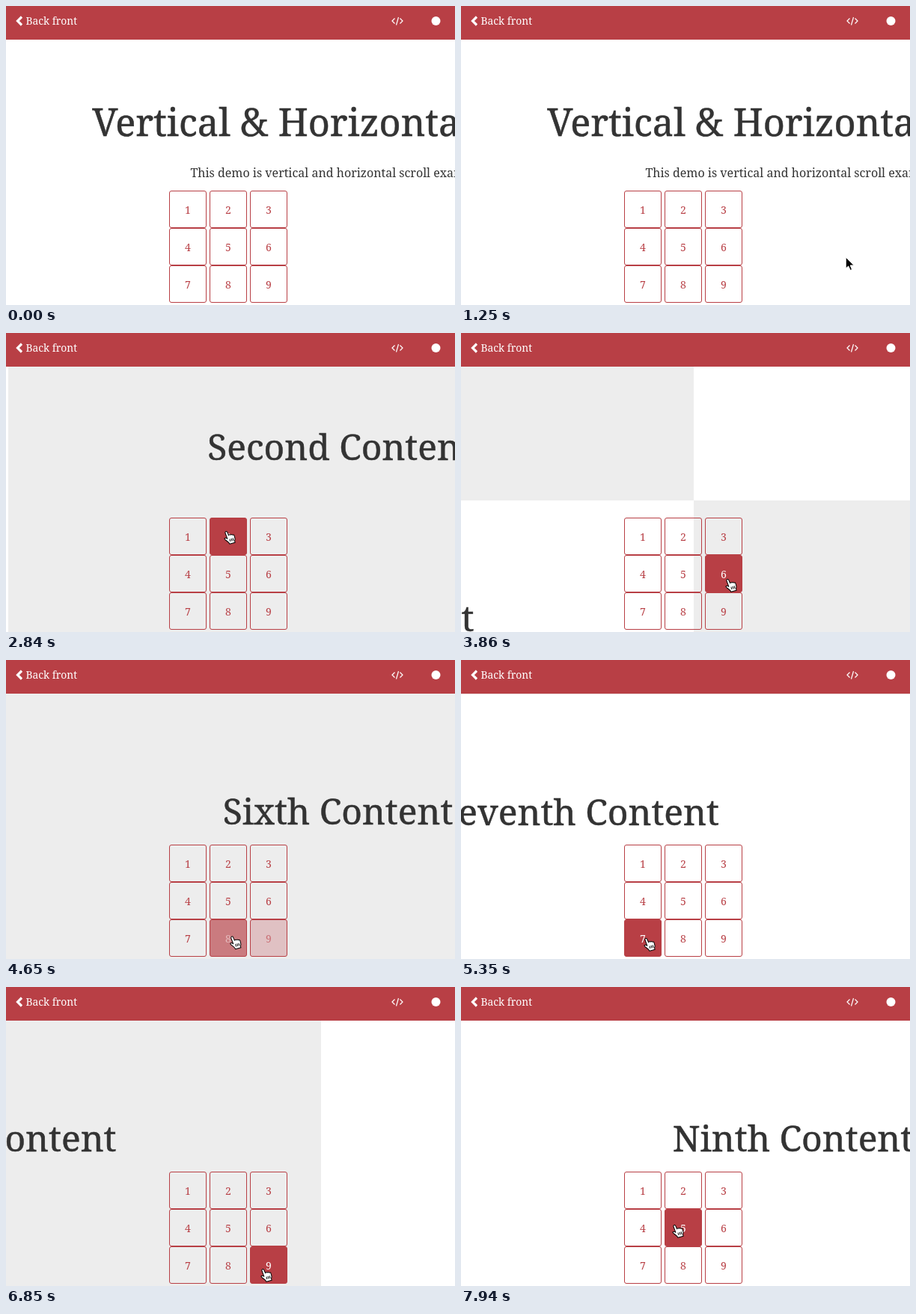
Recreate the animation shown at these times as an HTML page. Size 600 by 400 pixels, loop 8 s.

```html
<!DOCTYPE html>
<html lang="en">
<head>
<meta charset="utf-8">
<title>Vertical and horizontal scroll</title>
<style>
  html, body { margin: 0; width: 100%; height: 100%; overflow: hidden; background: #fff; }
  svg { display: block; width: 600px; height: 400px; font-family: "Noto Serif", serif; }
  .mid { text-anchor: middle; }
  .title { stroke: #333; stroke-width: .5; }
</style>
</head>
<body>
<svg viewBox="0 0 600 400">
  <g id="page" fill="#333"></g>
  <rect width="600" height="45" fill="#b83f45"/>
  <g fill="none" stroke="#fff">
    <path d="M21 14.5L15.5 20L21 25.5" stroke-width="3.2"/>
    <path d="M519.5 16.5L516 20L519.5 23.5M526.5 16.5L530 20L526.5 23.5M524.5 15L521.5 25.5" stroke-width="1.2"/>
  </g>
  <circle cx="574.5" cy="20" r="6" fill="#fff"/>
  <text x="26.5" y="25" font-size="13.8" fill="#fff">Back front</text>
  <g id="pad" font-size="14"></g>
  <path id="arrow" d="M0 0V15L3.5 12L6 17.5L8.3 16.5L6 11H11Z" stroke="#fff"/>
  <g id="hand" stroke="#000" stroke-linejoin="round">
    <g transform="translate(-2) rotate(-15)">
      <path fill="#fff" d="M-1.4 1.2Q-1.4 -.5 .1 -.5T1.6 1.2L2.3 5.5Q3 4.3 4.8 5.5Q6.2 4.7 7.2 6.2Q9.3 6 9.3 8V11Q9.3 13 8 14.5V17H.5Q.3 15 -2.5 11.5Q-4.8 9 -4.2 8Q-2.8 6.8 -.6 9.5Z"/>
      <path fill="none" d="M2.3 10.5V14M4.5 10.5V14M6.6 10.5V14"/>
    </g>
  </g>
</svg>
<script>
const LOOP = 8000, W = 887, H = 560, TOP = -5, BAR = 50;
const CELL = 50, SCROLL_MS = 800, FADE_MS = 200;
const ORDINALS = ['Second', 'Third', 'Fourth', 'Fifth', 'Sixth', 'Seventh', 'Eighth', 'Ninth'];

// The pointer glides to each stop; a click there scrolls to the section of that button.
const ENTRY = [562, 415];
const STOPS = [
  { leave: 580, arrive: 830, at: [536, 343] },
  { leave: 1080, arrive: 2000, at: [296, 266], click: 2191.4 },
  { leave: 2960, arrive: 3600, at: [358, 330], click: 3740 },
  { leave: 4270, arrive: 4680, at: [303, 371], click: 4720 },
  { leave: 4950, arrive: 5180, at: [249, 373], click: 5220 },
  { leave: 6220, arrive: 6440, at: [345, 378], click: 6685 },
  { leave: 7570, arrive: 7780, at: [287, 319] }
];

const $ = id => document.getElementById(id);
const clamp = p => Math.min(1, Math.max(0, p));
const mix = (a, b, p) => a.map((v, i) => v + (b[i] - v) * p);
const smooth = p => p * p * (3 - 2 * p);
const easeOutExpo = p => p === 1 ? 1 : 1 - 2 ** (-10 * p);

function add(parent, tag, attrs, text = '') {
  const el = document.createElementNS('http://www.w3.org/2000/svg', tag);
  for (const key in attrs) el.setAttribute(key, attrs[key]);
  el.textContent = text;
  return parent.appendChild(el);
}

const label = (parent, x, y, size, text, style = '') =>
  add(parent, 'text', { class: 'mid ' + style, x, y, 'font-size': size }, text);

const cells = Array.from({ length: 9 }, (_, i) => {
  const col = i % 3, row = Math.floor(i / 3);
  const section = add($('page'), 'g', { transform: `translate(${col * W} ${row * H})` });
  add(section, 'rect', { width: W, height: H, fill: i % 2 ? '#ededed' : '#fff' });
  if (i) {
    label(section, W / 2, 175, 48, ORDINALS[i - 1] + ' Content', 'title');
  } else {
    label(section, W / 2, 179, 50.5, 'Vertical & Horizontal Scroll', 'title');
    label(section, W / 2, 234, 16, 'This demo is vertical and horizontal scroll example.');
  }
  const x = 218 + col * (CELL + 4), y = 247 + row * CELL;
  const box = add($('pad'), 'rect', {
    x: x + .5, y: y + .5, width: CELL - 1, height: CELL - 1, rx: 2.5,
    fill: '#b83f45', stroke: '#b83f45'
  });
  return {
    x, y, box,
    digit: label($('pad'), x + CELL / 2, y + 31, 14, i + 1),
    scroll: [col * W, row && row * H - BAR]
  };
});

const inside = (c, [x, y]) => x >= c.x && x < c.x + CELL && y >= c.y && y < c.y + CELL;
const cellAt = p => cells.find(c => inside(c, p));

const pointerAt = t => STOPS.reduce((pos, { leave, arrive, at }) =>
  mix(pos, at, smooth(clamp((t - leave) / (arrive - leave)))), ENTRY);

const scrollAt = t => STOPS.filter(s => s.click).reduce((pos, { at, click }) =>
  mix(pos, cellAt(at).scroll, easeOutExpo(clamp((t - click) / SCROLL_MS))), [0, 0]);

function draw(t) {
  const [sx, sy] = scrollAt(t).map(Math.round);
  $('page').setAttribute('transform', `translate(${-sx} ${TOP - sy})`);

  const tip = pointerAt(t);
  const shown = cellAt(tip) ? 'hand' : 'arrow';
  for (const id of ['hand', 'arrow']) {
    $(id).setAttribute('transform', `translate(${tip})`);
    $(id).style.display = id === shown ? '' : 'none';
  }

  // hover strength: share of the recent past spent over the cell
  const N = 20;
  const trail = Array.from({ length: N }, (_, i) => pointerAt(t - (i + .5) * FADE_MS / N));
  for (const c of cells) {
    const k = trail.filter(p => inside(c, p)).length / N;
    c.box.setAttribute('fill-opacity', k);
    c.digit.setAttribute('fill', `rgb(${mix([184, 63, 69], [255, 255, 255], k)})`);
  }
}

const begin = performance.now();
function tick() {
  draw((performance.now() - begin) % LOOP);
  requestAnimationFrame(tick);
}
tick();
</script>
</body>
</html>
```
